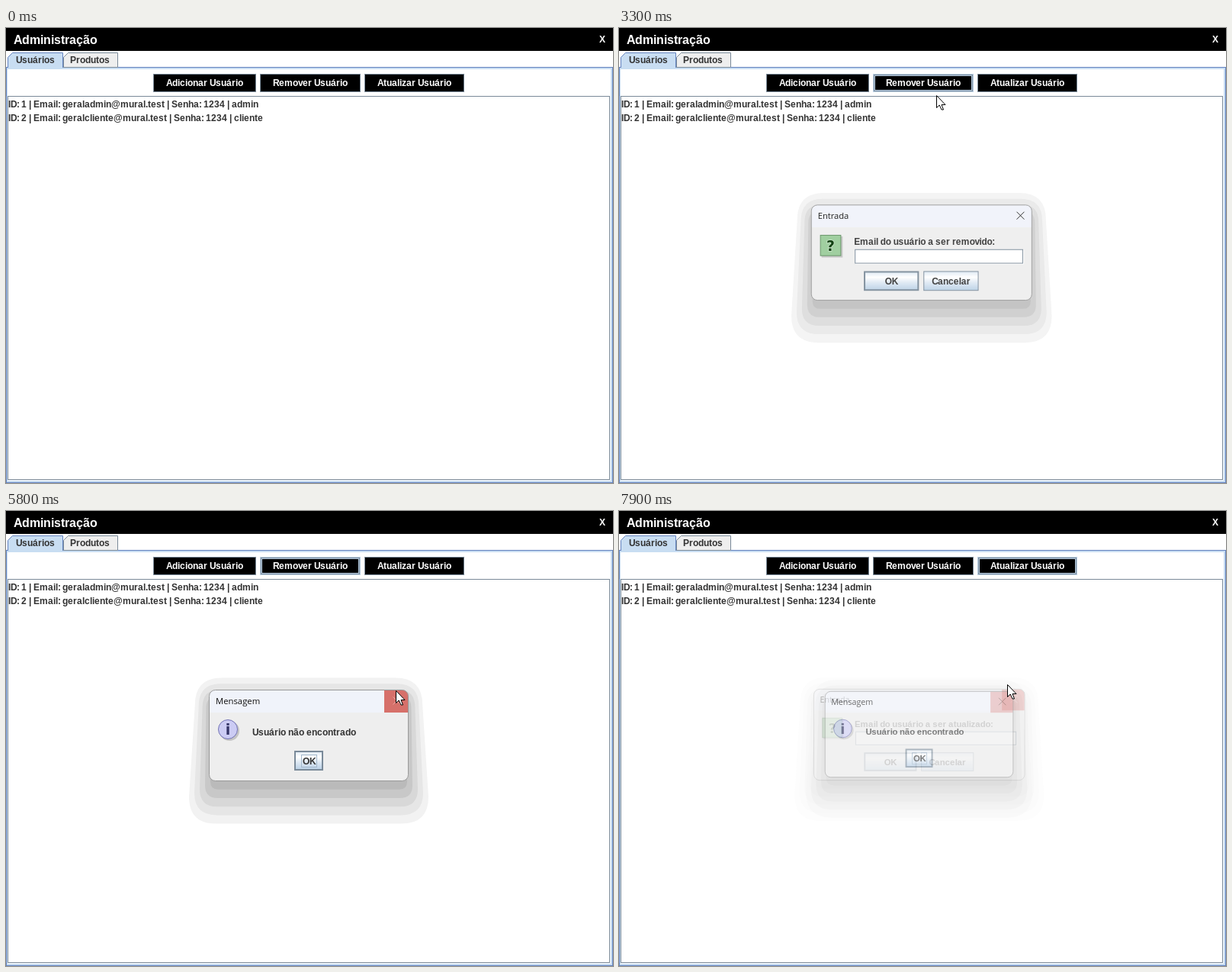
An HTML page that plays this animation: 796 px wide and 596 px high, repeating every 8000 ms.

```html
<!DOCTYPE html>
<html lang="pt">
<head>
<meta charset="utf-8">
<title>Administração</title>
<style>
  html, body { margin: 0; width: 100%; height: 100%; overflow: hidden; background: #fff; }
  svg { display: block; }
  text { font: bold 12px "Liberation Sans", sans-serif; white-space: pre; }
  text.caption { font: 11.3px "Open Sans", sans-serif; }
  text.mark { font: bold 19px "DejaVu Sans", sans-serif; text-anchor: middle; }
</style>
</head>
<body>
<svg id="stage" width="796" height="596" viewBox="0 0 796 596"></svg>
<script>
const stage = document.getElementById('stage');
const pen = document.createElement('canvas').getContext('2d');
const INK = '#333', EDGE = '#7a8a99', BLUE = '#6382bf', PALE = '#b8cfe5';

const rect = (x, y, w, h, fill, extra = '') =>
  `<rect x="${x}" y="${y}" width="${w}" height="${h}" fill="${fill}" ${extra}/>`;
const box = (x, y, w, h, fill, stroke = EDGE, line = 1) =>
  rect(x + line / 2, y + line / 2, w - line, h - line, fill, `stroke="${stroke}" stroke-width="${line}"`);
const path = (d, fill, stroke = 'none') => `<path d="${d}" fill="${fill}" stroke="${stroke}"/>`;

// Swing advances every glyph by whole pixels; capitals, colon and v round down
pen.font = 'bold 1000px "Liberation Sans", sans-serif';
function advance(c, size) {
  const w = pen.measureText(c).width * size / 1000;
  return /[A-Z:v]/.test(c) ? Math.floor(w) : Math.round(w);
}

function label(x, y, words, fill = INK, size = 12) {
  const places = [...words].map(c => {
    const at = x;
    x += advance(c, size);
    return at;
  });
  return `<text x="${places.join(' ')}" y="${y}" fill="${fill}" style="font-size:${size}px">${words}</text>`;
}

const actions = [[193, 135, 'Adicionar'], [333, 132, 'Remover'], [470, 131, 'Atualizar']];
const actionButton = ([x, w, verb], i) =>
  box(x, 60, w, 24, '#000') +
  `<g id="ring${i}">` + [PALE, EDGE, PALE].map((c, n) =>
    box(x + n, 60 + n, w - 2 * n, 24 - 2 * n, 'none', c)).join('') + '</g>' +
  label(x + 17, 76, verb + ' Usuário', '#fff');

const mainWindow = () =>
  rect(0, 0, 796, 30, '#000') +
  label(10, 21, 'Administração', '#fff', 16) + label(778, 19, 'X', '#fff') +
  box(0, 51, 796, 545, '#c8ddf2', BLUE) +
  rect(2, 54, 791, 539, '#fff') +
  path('M75.5 51.5V38.5L81.5 32.5H146.5V51.5Z', '#eee', EDGE) +
  path('M2.5 52V38.5L8.5 32.5H74.5V52', '#c8ddf2', BLUE) +
  label(13, 46, 'Usuários') + label(84, 46, 'Produtos') +
  actions.map(actionButton).join('') +
  box(2, 89, 790, 503, '#fff') +
  label(3, 104, 'ID: 1 | Email: geraladmin@mural.test | Senha: 1234 | admin') +
  label(3, 122, 'ID: 2 | Email: geralcliente@mural.test | Senha: 1234 | cliente');

function shadowBand({ x, y, w, h }, e, fill) {
  const l = x - e, r = x + w + e, top = y - 1.1 * (e - 12), bottom = y + h + 14 + 1.6 * e;
  const lean = .3 * e, k = 12 + .9 * e;
  return path(`M${l + lean + k} ${top}H${r - lean - k}Q${r - lean} ${top} ${r - lean} ${top + k}
    L${r} ${bottom - k}Q${r} ${bottom} ${r - k} ${bottom}H${l + k}Q${l} ${bottom} ${l} ${bottom - k}
    L${l + lean} ${top + k}Q${l + lean} ${top} ${l + lean + k} ${top}Z`, fill);
}

function button(x, y, w, words, textX, line = 1, focused) {
  return box(x, y, w, 26, 'url(#steel)', EDGE, line) +
    (focused ? box(textX - 2, y + 5, 21, 17, 'none', '#a3b8cc') : '') + label(textX, y + 18, words);
}
const field = (x, y, w) => rect(x + 1, y + 1, w, 19, '#fff') + box(x, y, w, 19, '#fff');
const okCancel = (x, y, focused) =>
  button(x, y, 73, 'OK', x + 28, 2, focused) + button(x + 79, y, 73, 'Cancelar', x + 90);

const question = (x, y) =>
  rect(x + 2, y + 2, 28, 28, '#c4c4c4') + box(x, y, 28, 28, '#99cc99', '#5f8f5f') +
  `<text class="mark" x="${x + 14}" y="${y + 21}" fill="#003300" stroke="#cfe8cf" stroke-width="1.5"
    paint-order="stroke">?</text>`;
const info = (x, y) =>
  `<circle cx="${x + 2}" cy="${y + 2}" r="13" fill="#c4c4c4"/>
   <circle cx="${x}" cy="${y}" r="12.5" fill="#ccccf4" stroke="#7272b4"/>
   <text class="mark" x="${x}" y="${y + 7}" fill="#333366">i</text>`;

const emailPrompt = verb =>
  question(263, 271) + label(308, 284, `Email do usuário a ser ${verb}:`) +
  field(309, 290, 223) + okCancel(321, 319);
const notFound = info(291, 286) + label(323, 294, 'Usuário não encontrado') +
  button(378, 314, 38, 'OK', 389, 2, true);
const newUser = question(278, 229) +
  ['Nome:', 'Email:', 'Senha:'].map((s, i) => label(323, 242 + 42 * i, s) + field(324, 248 + 42 * i, 194)).join('') +
  okCancel(322, 361, true);

const prompt = { x: 251, y: 231, w: 293, h: 127, title: 'Entrada' };
const message = { x: 266, y: 234, w: 262, h: 120, title: 'Mensagem', body: notFound };
const dialogs = [
  { x: 266, y: 188, w: 264, h: 212, title: 'Adicionar Usuário', body: newUser, open: 1800, close: 2700, hover: 2400 },
  { ...prompt, body: emailPrompt('removido'), open: 3200, close: 5100, hover: 5000 },
  { ...prompt, body: emailPrompt('atualizado'), open: 6800, close: 7800, hover: 7600 },
  { ...message, open: 5200, close: 6300, hover: 5200 },
  { ...message, open: 7900, close: 9000, hover: 7900 }
];

function dialog(d, i) {
  const { x, y, w, h } = d, cx = x + w - 15.5, cy = y + 14.5;
  const cross = color => path(`M${cx - 5} ${cy - 5}l10 10m0 -10l-10 10`, 'none', color);
  const frame = `x="${x + .5}" y="${y + .5}" width="${w - 1}" height="${h - 1}" rx="8"`;
  const bands = ['#f2f2f2', '#e6e6e6', '#d8d8d8', '#c8c8c8', '#bababa'];
  return `<g id="dialog${i}"><g id="shadow${i}">` +
    bands.map((c, n) => shadowBand(d, 26 - 7 * n, c)).join('') +
    `</g><clipPath id="clip${i}"><rect ${frame}/></clipPath><g clip-path="url(#clip${i})">` +
    rect(x, y, w, h, '#eee') + rect(x, y, w, 30, '#f0f3fa') + cross('#222') +
    `<g id="hover${i}">${rect(x + w - 32, y, 32, 30, '#d6706a')}${cross('#e9aaa4')}</g></g>
     <rect ${frame} fill="none" stroke="#999"/>
     <text class="caption" x="${x + 9}" y="${y + 19}" fill="#111">${d.title}</text>${d.body}</g>`;
}

stage.innerHTML = `<defs><linearGradient id="steel" x2="0" y2="1">
    <stop stop-color="#dde8f3"/><stop offset=".3" stop-color="#fff"/>
    <stop offset=".6" stop-color="#dde8f3"/><stop offset="1" stop-color="${PALE}"/>
  </linearGradient></defs>` + mainWindow() + dialogs.map(dialog).join('') +
  `<g id="cursor">${path('M.5 .5V16.5L4.2 13L7 19H9.5L7 12.5H12Z', '#fff', '#000')}</g>`;

const el = id => document.getElementById(id);
const cursor = el('cursor');
const route = [
  [200, 24, 31], [500, 130, 110], [800, 252, 140], [1000, 160, 183], [1200, 208, 86], [1400, 262, 66],
  [1800, 262, 68], [2500, 498, 193], [2700, 498, 193], [3000, 400, 68], [3200, 400, 68], [4000, 527, 228],
  [4500, 524, 91], [4900, 528, 222], [5100, 528, 222], [5500, 511, 235], [6300, 511, 235],
  [6500, 511, 143], [6600, 535, 68], [6800, 535, 68], [7600, 509, 230], [7900, 509, 227]
];
const rings = [[1400, 2900], [3000, 6400], [6600, 8000]];
// Opacity and scale at each step of opening and closing
const appear = [[.6, .945], [.92, .99]];
const vanish = [[.75, .993], [.42, .947], [.05, .96]];

function cursorAt(t) {
  const i = Math.max(1, route.findIndex(p => p[0] >= t));
  const [t0, x0, y0] = route[i - 1], [t1, x1, y1] = route[i];
  const k = (t - t0) / (t1 - t0);
  return [x0 + (x1 - x0) * k, y0 + (y1 - y0) * k].map(Math.round);
}

function dialogState(t, { open, close }) {
  if (t < open) return [0, 1];
  if (t >= close) return vanish[(t - close) / 100] || [0, 1];
  return appear[(t - open) / 100] || [1, 1];
}

function draw(t) {
  rings.forEach(([on, off], i) => el('ring' + i).style.display = t >= on && t < off ? '' : 'none');
  dialogs.forEach((d, i) => {
    const [alpha, scale] = dialogState(t, d), g = el('dialog' + i);
    const px = d.x + .26 * d.w, py = d.y + .28 * d.h;
    g.style.display = alpha ? '' : 'none';
    g.setAttribute('opacity', alpha);
    g.setAttribute('transform', `translate(${px} ${py}) scale(${scale}) translate(${-px} ${-py})`);
    el('shadow' + i).setAttribute('opacity', alpha);
    el('hover' + i).setAttribute('opacity', Math.min(1, Math.max(0, (t - d.hover + 100) / 200)));
  });
  cursor.style.display = t < 200 ? 'none' : '';
  if (t >= 200) cursor.setAttribute('transform', `translate(${cursorAt(t)})`);
}

// The picture advances ten times a second
function tick() {
  draw(Math.floor(performance.now() % 8000 / 100) * 100);
  requestAnimationFrame(tick);
}
tick();
</script>
</body>
</html>
```
